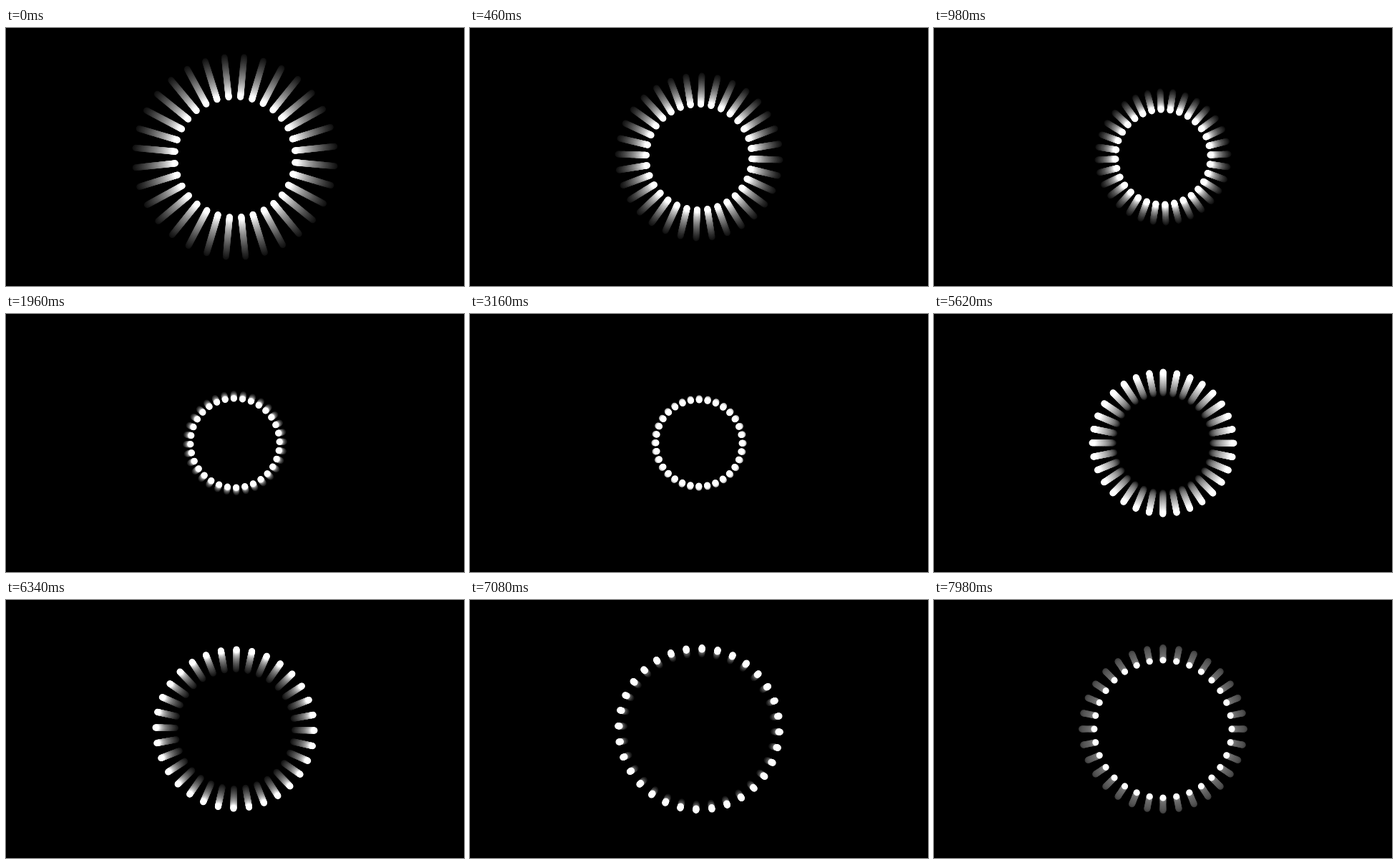
These frames come from a looping animation (640x360 px, 8000 ms). An HTML page with a canvas:

```html
<!DOCTYPE html>
<html lang="en">
<head>
<meta charset="utf-8">
<title>Breathing ring</title>
<style>
  html, body { margin: 0; width: 100%; height: 100%; overflow: hidden; background: #000; }
  canvas { display: block; width: 640px; height: 360px; }
</style>
</head>
<body>
<canvas id="stage" width="640" height="360"></canvas>
<script>
  const ctx = document.getElementById('stage').getContext('2d');
  const LOOP = 8000, STEP = 20, TRAIL = 1200, FADE = 1280;
  const DOTS = 32, DOT_RADIUS = 4.5;

  // Each move is an eased change: start (ms), duration (ms), amount
  const radius = {
    base: 217,
    moves: [
      [-4700, 7000, -155],  // long contraction
      [2700, 350, -2],      // small dip
      [3200, 250, 6],       // quick push out
      [3380, 3900, 47.5],   // long expansion
      [6900, 550, -17.7]    // quick pull in
    ]
  };
  const angle = {
    base: 5.2,
    moves: [
      [0, 980, -7.7], [980, 2180, 2.7], [3160, 1000, 5.1],
      [4160, 1460, -5.2], [5620, 1460, 2], [7080, 900, -2.1]
    ]
  };

  function easeInOut(u) {
    if (u <= 0) return 0;
    if (u >= 1) return 1;
    return u < 0.5 ? 4 * u ** 3 : 1 - 4 * (1 - u) ** 3;
  }

  function valueAt(track, t) {
    return track.moves.reduce(
      (sum, [start, duration, amount]) => sum + amount * easeInOut((t - start) / duration),
      track.base
    );
  }

  // Half-pixel steps keep slow trails from piling up
  const radiusAt = t => Math.round(valueAt(radius, t) * 2) / 2;

  function drawRing(size, turn, light) {
    const shade = Math.round(255 * light);
    ctx.fillStyle = `rgb(${shade},${shade},${shade})`;
    ctx.beginPath();
    for (let i = 0; i < DOTS; i++) {
      const direction = turn + i * 2 * Math.PI / DOTS;
      const x = 320 + size * Math.cos(direction);
      const y = 180 + size * Math.sin(direction);
      ctx.moveTo(x + DOT_RADIUS, y);
      ctx.arc(x, y, DOT_RADIUS, 0, 2 * Math.PI);
    }
    ctx.fill();
  }

  function draw(time) {
    const t = Math.floor(time % LOOP / STEP) * STEP;
    const turn = valueAt(angle, t) * Math.PI / 180;
    ctx.fillStyle = '#000';
    ctx.fillRect(0, 0, 640, 360);
    // The trail turns together with the ring, oldest copies at the back
    for (let age = TRAIL; age >= 0; age -= STEP) {
      const size = radiusAt(t - age);
      const covered = age > 0 && size === radiusAt(t - age + STEP);
      if (!covered) drawRing(size, turn, 1 - age / FADE);
    }
  }

  const start = performance.now();
  function tick() {
    draw(performance.now() - start);
    requestAnimationFrame(tick);
  }
  tick();
</script>
</body>
</html>
```
